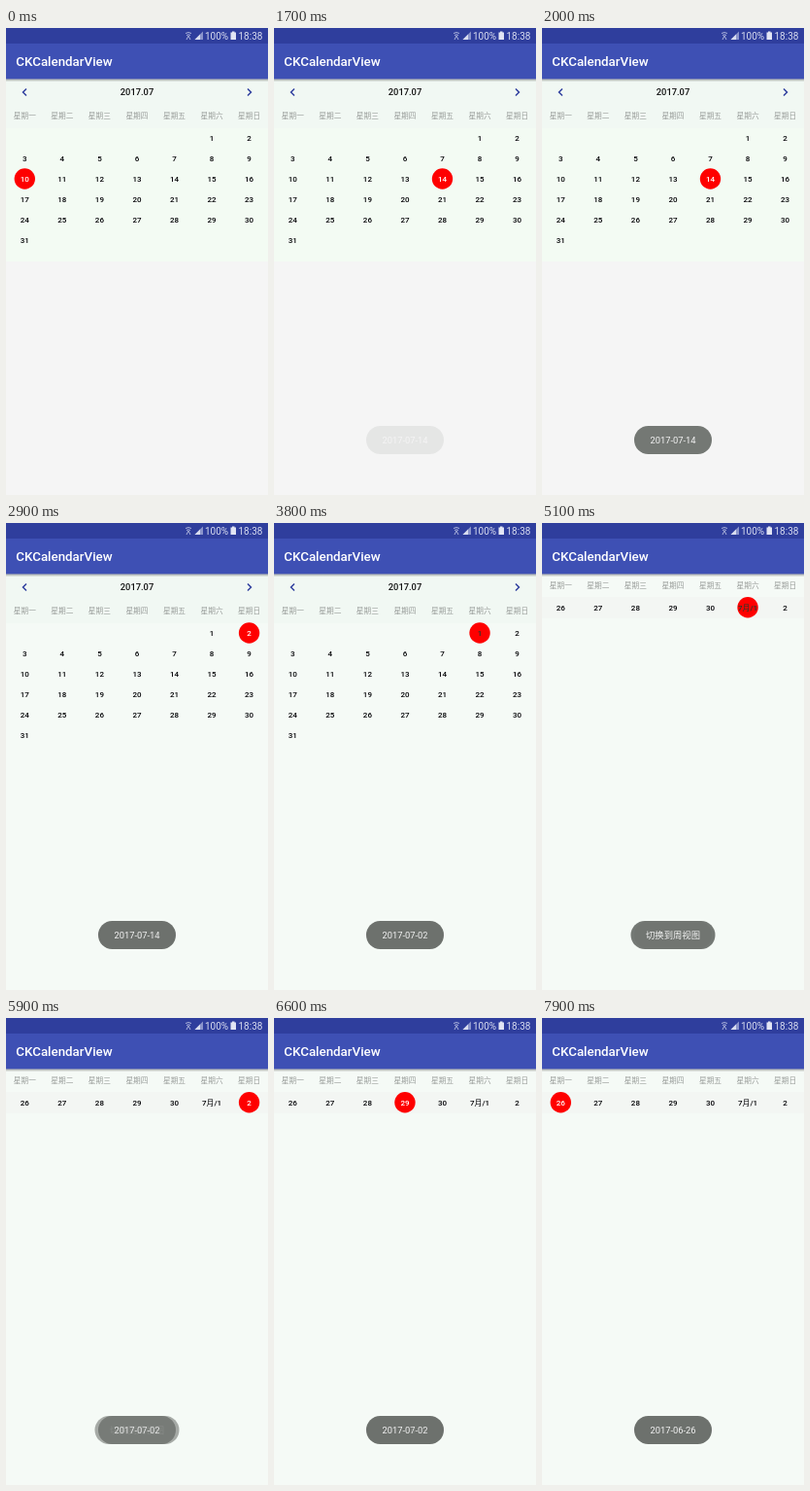
These frames come from a looping animation (270 by 480 pixels, 8 s). An HTML page:

```html
<!DOCTYPE html>
<html lang="zh">
<head>
<meta charset="utf-8">
<title>Calendar</title>
<style>
html, body { margin: 0; width: 100%; height: 100%; overflow: hidden; background: #f5faf6; }
svg { display: block; width: 100vw; height: 100vh; font-family: Roboto, "Noto Sans CJK SC", "Noto Sans CJK", sans-serif; }
.mid { text-anchor: middle; }
.day { font-size: 8px; fill: #050508; font-weight: 500; }
.week { font-size: 7.7px; fill: #999d9a; }
.bar { font-size: 10px; fill: #d9ddf0; }
.toast { font-size: 9.33px; fill: #f4f4f4; }
</style>
</head>
<body>
<svg id="stage" viewBox="0 0 270 480">
  <defs>
    <linearGradient id="shade" x1="0" y1="0" x2="0" y2="1">
      <stop offset="0" stop-color="#000" stop-opacity=".3"/>
      <stop offset="1" stop-color="#000" stop-opacity="0"/>
    </linearGradient>
  </defs>
  <rect id="page" width="270" height="480"/>
  <rect id="panel" y="53" width="270" height="187"/>
  <g id="month">
    <rect y="53" width="270" height="50" fill="#f1f8f3"/>
    <g fill="none" stroke="#303f9f" stroke-width="1.5">
      <path d="M21 62.5L17.5 66L21 69.5"/>
      <path d="M249 62.5L252.5 66L249 69.5"/>
    </g>
    <text class="mid" x="135" y="69.3" font-size="9.33" font-weight="500" fill="#111">2017.07</text>
  </g>
  <rect id="strip" y="76" width="270" height="22" fill="#f3f6f3"/>
  <g id="names"></g>
  <circle id="dot" r="10.7" fill="#fe0000"/>
  <g id="monthDays"></g>
  <g id="weekDays"></g>
  <rect width="270" height="16" fill="#2f3e9d"/>
  <rect y="16" width="270" height="36.5" fill="#3e50b4"/>
  <rect y="52.5" width="270" height="3" fill="url(#shade)"/>
  <text x="10.3" y="39" font-size="13.33" font-weight="500" fill="#fff">CKCalendarView</text>
  <g fill="none" stroke="#b9c0e3" stroke-width=".9">
    <path d="M185 5.5Q188 3.500 191 5.500M186 7.500Q188 6 190 7.500M186 12L188 8L190 12"/>
  </g>
  <path d="M194.500 12L203 3.500V12Z" fill="#8b95cc"/>
  <path d="M194.500 12L200 6.500V12Z" fill="#d9ddf0"/>
  <path d="M231.500 4.500H233V3.500H235.500V4.500H237V12H231.500Z" fill="#e2e5f4"/>
  <text class="bar" x="205" y="11.700">100%</text>
  <text class="bar" x="239.500" y="11.700">18:38</text>
  <g id="toasts"></g>
</svg>
<script>
const $ = id => document.getElementById(id);
const NS = "http://www.w3.org/2000/svg";
const LOOP = 8000, STEP = 100, WEEK_AT = 4800;

function add(parent, tag, attrs, text) {
  const el = document.createElementNS(NS, tag);
  for (const k in attrs) el.setAttribute(k, attrs[k]);
  if (text) el.textContent = text;
  return parent.appendChild(el);
}

const colX = i => 19.3 + i * 38.55;
const rowY = i => 113 + i * 21;

[..."一二三四五六日"].forEach((c, i) =>
  add($("names"), "text", { class: "week mid", x: colX(i), y: 93.2 }, "星期" + c));

function addDay(parent, label, x, y) {
  const el = add(parent, "text", { class: "day mid", x, y: y + 2.9 }, label);
  return { el, x, y };
}

const monthDays = {}, weekDays = {};
for (let d = 1; d <= 31; d++) {
  const cell = d + 4;
  monthDays[d] = addDay($("monthDays"), String(d), colX(cell % 7), rowY(Math.floor(cell / 7)));
}
[26, 27, 28, 29, 30, 1, 2].forEach((d, i) => {
  weekDays[d] = addDay($("weekDays"), d === 1 ? "7月/1" : String(d), colX(i), 86.7);
});

// Each tap selects a day and swaps the toast.
const taps = [
  { at: 1700, day: 14, msg: "2017-07-14" },
  { at: 2900, day: 2, msg: "2017-07-02" },
  { at: 3800, day: 1, msg: "2017-07-01" },
  { at: WEEK_AT, day: 1, msg: "切换到周视图", w: 87 },
  { at: 5700, day: 2, msg: "2017-07-02" },
  { at: 6600, day: 29, msg: "2017-06-29" },
  { at: 7200, day: 26, msg: "2017-06-26" }
];
for (const tap of taps) {
  const w = tap.w || 80;
  tap.el = add($("toasts"), "g", {});
  add(tap.el, "rect", { x: 135 - w / 2, y: 409, width: w, height: 29, rx: 14.5, fill: "#6d716d" });
  add(tap.el, "text", { class: "toast mid", x: 135, y: 427.2 }, tap.msg);
}

const progress = (t, at) => t < at ? 0 : Math.min(1, (t - at + 20) / 520);

function draw(t) {
  const week = t >= WEEK_AT;
  let day = 10;
  taps.forEach((tap, i) => {
    if (t >= tap.at) day = tap.day;
    const next = taps[i + 1];
    const shown = 1 - (1 - progress(t, tap.at)) ** 3;
    const gone = next && t > next.at ? progress(t, next.at) : 0;
    tap.el.setAttribute("opacity", shown * (1 - gone));
  });

  $("month").style.display = $("monthDays").style.display = week ? "none" : "";
  $("weekDays").style.display = $("strip").style.display = week ? "" : "none";
  $("names").setAttribute("transform", `translate(0 ${week ? -26 : 0})`);
  $("page").setAttribute("fill", t < 2200 ? "#f5f5f5" : "#f5faf6");
  $("panel").setAttribute("fill", t < 2200 ? "#f3fbf3" : "#f5faf6");

  const days = week ? weekDays : monthDays;
  for (const d in days) {
    days[d].el.style.fill = +d !== day ? "" : day === 1 ? "#243a2c" : "#fff";
  }
  $("dot").setAttribute("cx", days[day].x);
  $("dot").setAttribute("cy", days[day].y);
}

const start = performance.now();
function tick() {
  const t = (performance.now() - start) % LOOP;
  draw(Math.floor(t / STEP) * STEP);
  requestAnimationFrame(tick);
}
tick();
</script>
</body>
</html>
```
